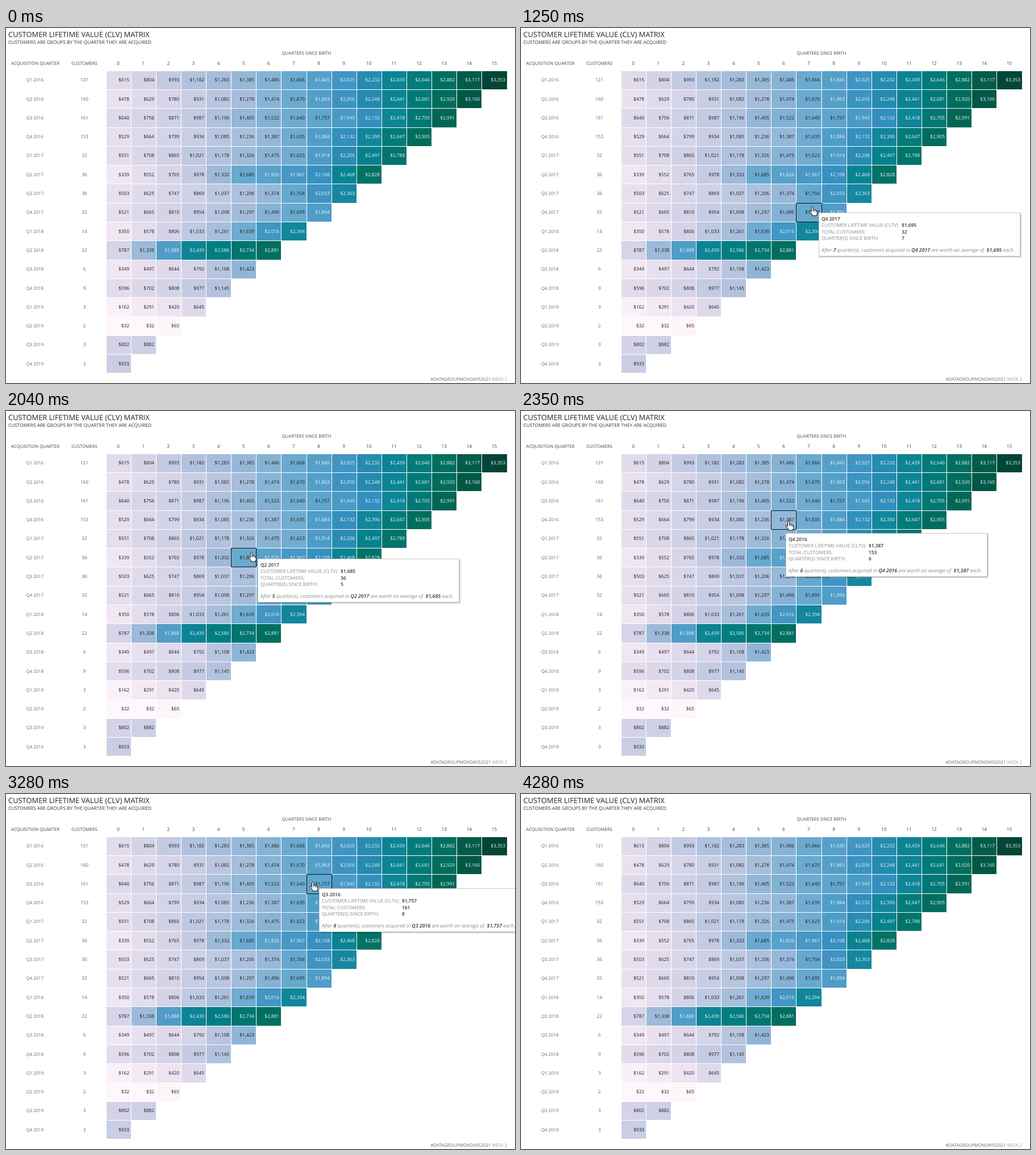
Recreate the animation shown at these times as an HTML page. Size 896 by 625 pixels, loop 4760 ms.

```html
<!DOCTYPE html>
<html lang="en">
<head>
<meta charset="utf-8">
<title>CLV matrix</title>
<style>
html, body { margin: 0; width: 100%; height: 100%; overflow: hidden; background: #fff; }
svg { display: block; width: 896px; height: 625px; }
text { font: 7.8px "Open Sans", "Noto Sans", sans-serif; text-rendering: geometricPrecision; white-space: pre; fill: #666; }
.mid { text-anchor: middle; }
.end { text-anchor: end; }
.title { font-size: 12.9px; font-weight: 500; fill: #222; }
.sub { font-size: 8.3px; font-weight: 500; fill: #333; }
.head { font-weight: 500; fill: #444; }
.num { font-size: 8.3px; }
.tip { font-size: 8.4px; fill: #8a8a8a; }
.note { font-size: 8.8px; font-style: italic; fill: #8a8a8a; }
.strong { font-weight: 600; fill: #333; }
#tip { filter: drop-shadow(1px 1px 1px #0006); }
</style>
</head>
<body>
<svg id="stage" viewBox="0 0 896 625"></svg>
<script>
const ROWS = 16, LEFT = 175.5, TOP = 74.6, W = 44.13, H = 33.3;
const customers = [121, 160, 161, 153, 32, 36, 36, 32, 14, 22, 6, 9, 3, 2, 3, 3];

// Key values of each cohort, spread evenly over its quarters.
const growth = [
  [615, 1182, 1486, 2025, 2646, 3353], [478, 1082, 1670, 2441, 3160],
  [640, 987, 1405, 1757, 2132, 2991], [529, 934, 1387, 2132, 2905],
  [551, 1178, 1623, 2788], [339, 978, 1685, 2108, 2828],
  [503, 869, 1374, 2363], [521, 1098, 1894], [350, 1261, 2394], [787, 2439, 2881],
  [349, 792, 1423], [596, 808, 1145], [162, 420, 645], [32, 32, 65], [802, 882], [933]
];

const mix = (a, b, u) => a + (b - a) * u;
const colX = c => Math.round(LEFT + c * W);
const rowY = r => Math.round(TOP + r * H);
const quarter = r => `Q${r % 4 + 1} ${2016 + (r >> 2)}`;
const money = v => '$' + v.toLocaleString('en-US');

function cohort(keys, r) {
  const count = ROWS - r, legs = keys.length - 1;
  const column = i => Math.round(i * (count - 1) / legs);
  return Array.from({ length: count }, (_, c) => {
    const i = keys.findLastIndex((_, k) => k === 0 || column(k) <= c);
    if (i === legs) return keys[i];
    const u = (c - column(i)) / (column(i + 1) - column(i));
    return Math.round(mix(keys[i], keys[i + 1], u));
  });
}
const values = growth.map(cohort);

const ramp = ['fff7fb', 'ece2f0', 'd0d1e6', 'a6bddb', '67a9cf', '3690c0', '02818a', '016c59', '014636']
  .map(hex => [0, 2, 4].map(i => parseInt(hex.slice(i, i + 2), 16)));
function shade(v) {
  const p = (v - 32) / (3353 - 32) * 8, i = Math.min(7, Math.floor(p));
  return `rgb(${ramp[i].map((a, k) => Math.round(mix(a, ramp[i + 1][k], p - i)))})`;
}

const text = (x, y, str, cls = '', attrs = '') =>
  `<text x="${x}" y="${y}" class="${cls}" ${attrs}>${str}</text>`;

let art = text(4, 15.5, 'CUSTOMER LIFETIME VALUE (CLV) MATRIX', 'title')
  + text(4, 28, 'CUSTOMERS ARE GROUPS BY THE QUARTER THEY ARE ACQUIRED', 'sub')
  + text(529, 47, 'QUARTERS SINCE BIRTH', 'mid head')
  + text(51.5, 65, 'ACQUISITION QUARTER', 'mid head')
  + text(138, 65, 'CUSTOMERS', 'mid head')
  + text(882, 621, '<tspan font-weight="500">#DATAGROUPMONDAYS2021</tspan><tspan font-weight="300"> WEEK 2</tspan>', 'end');

values.forEach((row, r) => {
  const y = rowY(r), base = TOP + (r + .5) * H + 3;
  art += text(LEFT + (r + .5) * W, 65.3, r, 'mid head num')
    + text(51, base, quarter(r), 'mid')
    + text(138, base, customers[r], 'mid num');
  row.forEach((v, c) => {
    const x = colX(c), right = colX(c + 1);
    art += `<rect x="${x + 1}" y="${y + 1}" width="${right - x - 1}" height="${rowY(r + 1) - y - 1}" fill="${shade(v)}"/>`
      + text(right - 3, base, money(v), 'end num', `style="fill:${v > 1800 ? '#eaf3f7' : '#1e1e1e'}"`);
  });
});
art += `<rect id="outline" fill="none" stroke="#111"/>
<g id="tip"><rect x=".5" y=".5" width="354" height="76" fill="#fff" stroke="#ccc"/></g>
<g id="tipText"></g>
<g id="hand" stroke="#111" stroke-linejoin="round" stroke-linecap="round">
<path fill="#fff" d="M-1.5 9V1.5Q-1.5 0 0 0T1.5 1.5V6Q1.5 5 3 5.2Q4.2 5.3 4.3 6.5Q5 5.8 6 6Q7 6.2 7 7.3Q8.7 7 8.7 9V11.5Q8.6 13 7.8 14V16H0V14.5L-4.5 9Q-5.3 7.5 -4 7Q-3 6.8 -1.5 9Z"/>
<path fill="none" stroke-width=".8" d="M1.5 6V8.5M4.3 6.5V8.8M7 7.3V9.2"/></g>`;
stage.innerHTML = art;

const [outline, tip, tipText, hand] = ['outline', 'tip', 'tipText', 'hand'].map(id => document.getElementById(id));

// Pointer steps; in a trailing glide the tooltip stays one step behind.
const steps = [];
function glide(t0, t1, n, x0, y0, x1, y1, power = 1, trail = false) {
  for (let i = 0; i < n; i++) {
    const u = i / (n - 1), e = u ** power;
    const point = { t: Math.round(mix(t0, t1, u) / 10) * 10, x: mix(x0, x1, e), y: mix(y0, y1, e) };
    point.anchor = trail ? steps.at(-1) : point;
    steps.push(point);
  }
}
glide(360, 870, 8, 884, 612, 571, 372);
glide(950, 1430, 7, 535, 329, 446, 271, 2);
glide(1500, 1650, 3, 428, 261.5, 426, 259);
glide(1960, 2270, 5, 427, 258, 455, 204, 1.3);
glide(2350, 2430, 2, 471, 194, 478, 188, 1, true);
glide(2510, 2650, 3, 486, 182, 529, 161);
glide(2720, 2820, 2, 532, 162, 537, 159, 1, true);
glide(2890, 2970, 2, 538, 157, 539, 155);
glide(3280, 3430, 2, 540, 155, 541, 155);
glide(3660, 4210, 8, 549, 172, 773, 609, 1.1);

const cellAt = (x, y) => {
  const c = Math.floor((x - LEFT) / W), r = Math.floor((y - TOP) / H);
  return values[r]?.[c] ? { c, r, v: values[r][c] } : null;
};
const show = (el, on) => el.setAttribute('visibility', on ? 'visible' : 'hidden');
const move = (el, x, y) => el.setAttribute('transform', `translate(${x} ${y})`);

function tipLines({ c, r, v }) {
  const b = s => `<tspan class="strong">${s}</tspan>`;
  const line = (y, label, value) => text(5, y, label, 'tip') + text(146, y, value, 'tip strong');
  return text(5, 14, quarter(r), 'tip strong')
    + line(25.3, 'CUSTOMER LIFETIME VALUE (CLTV):', money(v))
    + line(37, 'TOTAL CUSTOMERS:', customers[r])
    + line(48.3, 'QUARTER(S) SINCE BIRTH:', c)
    + text(5, 69, `After ${b(c)} quarter(s), customers acquired in ${b(quarter(r))} are worth an average of  ${b(money(v))} each.`, 'note');
}

function drawStep(step) {
  const hovering = step?.t >= 1030;
  const cell = hovering && cellAt(step.x, step.y);
  const framed = hovering && cellAt(step.x - 4, step.y); // the outline trails the pointer
  show(hand, step);
  show(tip, cell);
  show(tipText, cell);
  show(outline, framed);
  if (step) move(hand, step.x, step.y);
  if (cell) {
    const x = Math.round(step.anchor.x + 11), y = Math.round(step.anchor.y + 10.5);
    move(tip, x, y);
    move(tipText, x, y);
    tipText.innerHTML = tipLines(cell);
  }
  if (framed) {
    const { c, r } = framed, x = colX(c), y = rowY(r);
    Object.entries({ x: x + .5, y: y + .5, width: colX(c + 1) - x, height: rowY(r + 1) - y })
      .forEach(([name, n]) => outline.setAttribute(name, n));
  }
}

let last = null;
function tick() {
  const t = performance.now() % 4760;
  const step = t < 4280 ? steps.findLast(s => s.t <= t) : undefined;
  if (step !== last) drawStep(step);
  last = step;
  requestAnimationFrame(tick);
}
tick();
</script>
</body>
</html>
```
